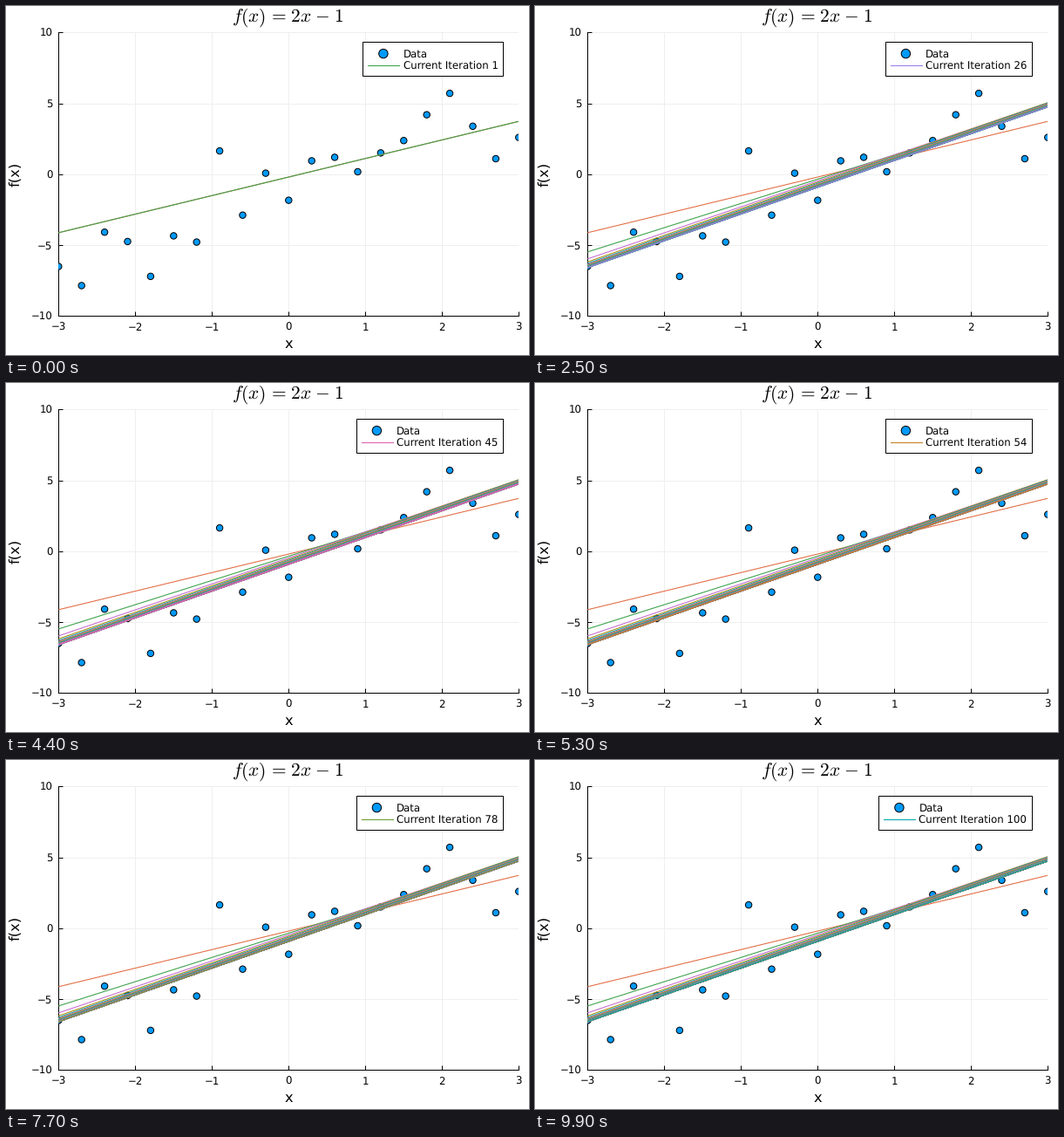
A matplotlib script for the animation above (10 s loop, 600 by 400 pixels).

```python
import numpy as np
import matplotlib.pyplot as plt
from matplotlib.animation import FuncAnimation
from matplotlib.collections import LineCollection
from matplotlib.patches import Circle, Rectangle

W, H, DPI = 600, 400, 100
STEPS, INTERVAL = 100, 100
RATE = 0.01
PX = 72 / DPI  # points per pixel

PALETTE = [
    "#009afa", "#e36f47", "#3ea44e", "#c371d2", "#ac8e18", "#00aaae",
    "#ed5e93", "#c68225", "#00a98d", "#8e971e", "#00a9cc", "#9b7fe9",
    "#618df6", "#f06073", "#dd65b6", "#6c9f33",
]

xs = np.linspace(-3, 3, 21)
ys = np.array([
    -6.5, -7.85, -4.08, -4.74, -7.2, -4.34, -4.78, 1.65, -2.88, 0.08, -1.83,
    0.95, 1.2, 0.18, 1.51, 2.38, 4.2, 5.71, 3.39, 1.1, 2.6,
])


def color(i):
    return PALETTE[i % len(PALETTE)]


def descend(steps):
    """Fitted line after every gradient descent step, as end points."""
    slope = offset = 0.0
    lines = []
    for _ in range(steps):
        err = ys - (slope * xs + offset)
        slope += RATE * np.sum(err * xs)
        offset += RATE * np.sum(err)
        lines.append([(x, slope * x + offset) for x in (-3, 3)])
    return lines


fits = descend(STEPS)

plt.rcParams.update({
    "font.family": "DejaVu Sans",
    "font.size": 11.8 * PX,
    "mathtext.fontset": "cm",
    "text.hinting": "none",
})
fig = plt.figure(figsize=(W / DPI, H / DPI), dpi=DPI, facecolor="white")

# Plot area
ax = fig.add_axes([60.3 / W, 1 - 355.4 / H, 528 / W, 325 / H])
ax.set(xlim=(-3, 3), ylim=(-10, 10),
       xticks=range(-3, 4), yticks=range(-10, 11, 5))
ax.set_axisbelow(True)
ax.grid(color="#efefef", lw=PX)
ax.tick_params(direction="in", length=5 * PX, width=PX, pad=7 * PX)
ax.spines[["top", "right"]].set_visible(False)
for side in ("left", "bottom"):
    ax.spines[side].set(linewidth=PX, zorder=1)

# One size per dot keeps the dots at sub-pixel positions
dot = dict(fc=color(0), ec="black", lw=PX)
ax.scatter(xs, ys, s=np.full(xs.size, (7.4 * PX) ** 2), zorder=2, **dot)
bundle = LineCollection([], linewidths=1.1 * PX, zorder=3)
ax.add_collection(bundle, autolim=False)

# Pixel-space layer for titles and legend
top = fig.add_axes([0, 0, 1, 1])
top.set(xlim=(0, W), ylim=(H, 0))
top.axis("off")

title = (r"$f(x)\hspace{0.12}=\hspace{0.12}2x"
         r"\hspace{0.06}-\hspace{0.06}1$")
top.text(323, 19, title, size=21.4 * PX, ha="center", va="baseline")
top.text(324, 391.5, "x", size=16.2 * PX, ha="center", va="baseline")
top.text(15.2, 192.7, "f(x)", size=16.4 * PX, ha="center", va="baseline",
         rotation=90, rotation_mode="anchor")

BOX_TOP, BOX_RIGHT, BOX_BOTTOM = 41, 570, 80
box = Rectangle((0, BOX_TOP), 1, BOX_BOTTOM - BOX_TOP, fc="white", ec="black",
                lw=PX, zorder=2)
key_dot = Circle((0, 54.6), 5.2, zorder=3, **dot)
top.add_patch(box)
top.add_patch(key_dot)
key_line, = top.plot([], [], lw=1.1 * PX, zorder=3)
data_label = top.text(0, 59, "Data", va="baseline", zorder=3)
step_label = top.text(0, 72, "", va="baseline", zorder=3)


def update(frame):
    n = frame + 1
    # Past fits, then the newest one again in the next colour
    bundle.set_segments(fits[:n] + [fits[frame]])
    bundle.set_color([color(i) for i in range(1, n + 2)])

    left = 409.2 - 7.5 * (len(str(n)) - 1)
    box.set_x(left)
    box.set_width(BOX_RIGHT - left)
    key_dot.center = left + 23.7, 54.6
    key_line.set_data([left + 6, left + 42], [68, 68])
    key_line.set_color(color(n + 1))
    data_label.set_x(left + 46.3)
    step_label.set_x(left + 46.3)
    step_label.set_text(f"Current Iteration {n}")
    return bundle, box, key_dot, key_line, data_label, step_label


anim = FuncAnimation(fig, update, frames=STEPS, interval=INTERVAL,
                     repeat=True, repeat_delay=0, blit=False)
plt.show()
```
